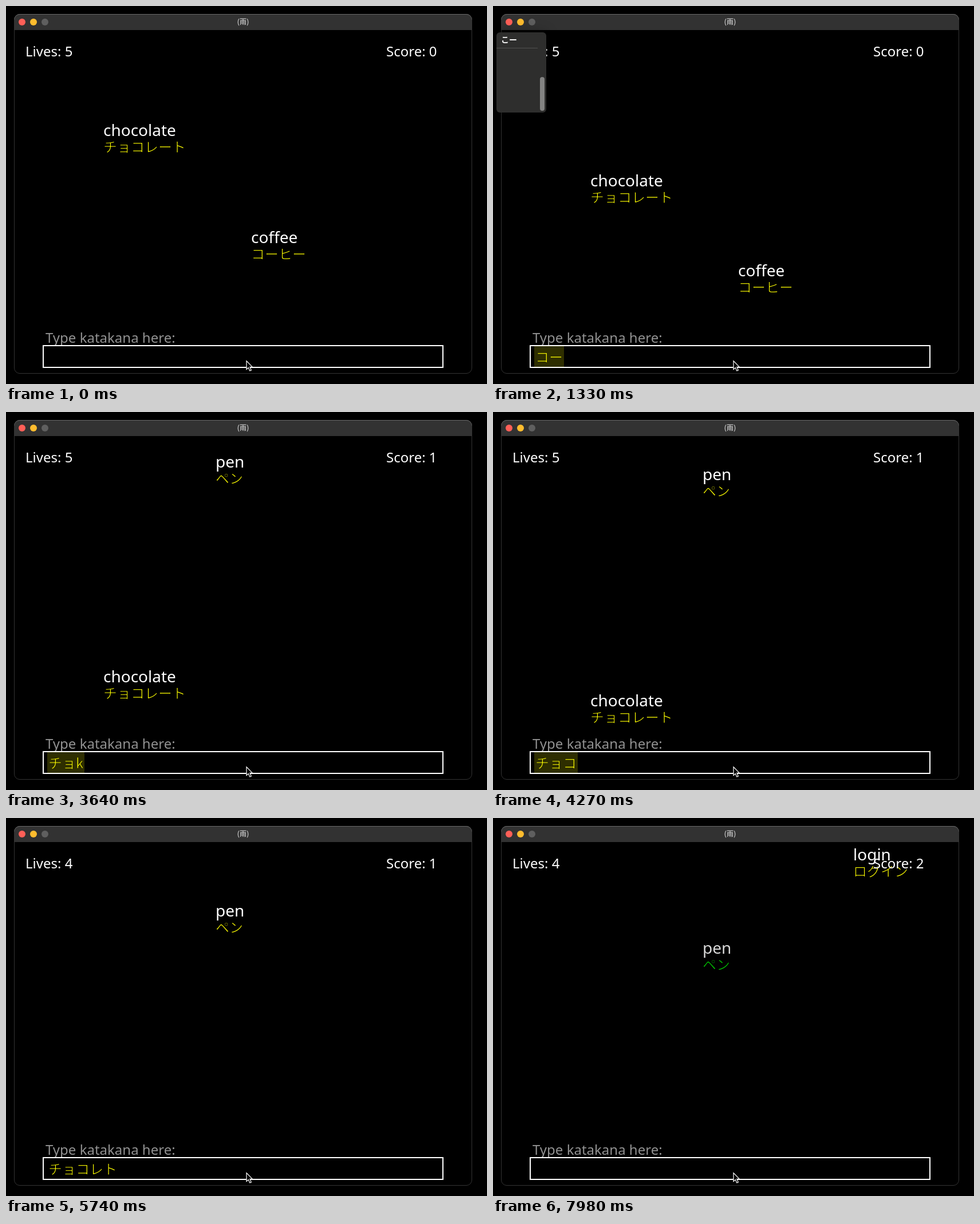
An HTML page with a canvas for the animation above (8000 ms loop, 840 by 660 pixels).

```html
<!DOCTYPE html>
<html lang="ja">
<head>
<meta charset="utf-8">
<title>(雨)</title>
<style>
html, body { margin: 0; width: 100%; height: 100%; overflow: hidden; background: #000; }
canvas { display: block; }
</style>
</head>
<body>
<canvas id="stage" width="840" height="660"></canvas>
<script>
const LOOP = 8000, STEP = 70;
const LATIN = '"Noto Sans", "Open Sans", sans-serif';
const CJK = '"Noto Sans CJK JP", "Noto Sans CJK", sans-serif';
const ctx = document.getElementById('stage').getContext('2d');

// path: [time, baseline] points; hit: moment the word is answered; gone: moment it is lost
const words = [
  { en: 'chocolate', ja: 'チョコレート', x: 170, gone: 5320,
    path: [[0, 227], [1330, 315], [2450, 393], [3640, 472], [4970, 560], [5320, 583]] },
  { en: 'coffee', ja: 'コーヒー', x: 428, hit: 2087,
    path: [[0, 414], [1330, 472], [2087, 505]] },
  { en: 'pen', ja: 'ペン', x: 366, hit: 7590,
    path: [[2970, 73], [3640, 97], [4970, 144], [6720, 208], [7590, 237]] },
  { en: 'login', ja: 'ログイン', x: 629, path: [[7980, 74], [8100, 78]] }
];

// [time, text, committed]
const typing = [
  [0, ''], [700, 'k'], [840, 'コ'], [1190, 'コー'], [1540, 'コーh'], [1680, 'コーヒ'],
  [1820, 'コーヒー'], [1960, 'コーヒー', true], [2087, ''],
  [3010, 'c'], [3150, 'ch'], [3360, 'チョ'], [3570, 'チョk'], [3710, 'チョコ'],
  [4340, 'チョコr'], [4480, 'チョコレ'], [4900, 'チョコレt'], [5110, 'チョコレト'],
  [5530, 'チョコレト', true], [6160, ''],
  [6860, 'p'], [7000, 'ペ'], [7210, 'ペn'], [7350, 'ペン'], [7490, 'ペン', true], [7590, '']
];

const popups = [
  { from: 1260, to: 1470, text: 'こー', w: 87, bar: [124, 59] },
  { from: 3850, to: 4060, text: 'ちょこ', w: 101, bar: [124, 59] },
  { from: 4900, to: 5040, text: 'チョコレート', w: 156, bar: [117, 54], emoji: true }
];

function textWidth(font, s) {
  ctx.font = font;
  return ctx.measureText(s).width;
}

const kanaFont = '100 24px ' + CJK;
const hasThin = textWidth(kanaFont, 'kt') !== textWidth('400 24px ' + CJK, 'kt');
const SS = 4;
const scratch = document.createElement('canvas');
scratch.width = 200 * SS;
scratch.height = 40 * SS;
const sc = scratch.getContext('2d');

function text(s, x, y, font, color) {
  ctx.font = font;
  ctx.fillStyle = color;
  ctx.fillText(s, x, y);
}

// Hairline kana; trims the regular weight where no thin one is installed
function kana(s, x, y, color) {
  if (hasThin) return text(s, x, y, kanaFont, color);
  sc.setTransform(SS, 0, 0, SS, 0, 0);
  sc.globalCompositeOperation = 'source-over';
  sc.clearRect(0, 0, 200, 40);
  sc.font = kanaFont;
  sc.fillStyle = color;
  sc.fillText(s, 4, 30);
  sc.globalCompositeOperation = 'destination-out';
  sc.lineWidth = 0.8;
  sc.lineJoin = 'round';
  sc.strokeText(s, 4, 30);
  ctx.imageSmoothingQuality = 'high';
  ctx.drawImage(scratch, x - 4, y - 30, 200, 40);
}

function rect(x, y, w, h, color) {
  ctx.fillStyle = color;
  ctx.fillRect(x, y, w, h);
}

function round(x, y, w, h, r, color) {
  ctx.beginPath();
  ctx.roundRect(x, y, w, h, r);
  ctx.fillStyle = color;
  ctx.fill();
}

function disc(x, y, r, color) {
  ctx.beginPath();
  ctx.arc(x, y, r, 0, Math.PI * 2);
  ctx.fillStyle = color;
  ctx.fill();
}

function along(path, t) {
  let i = 1;
  while (i < path.length - 1 && t > path[i][0]) i++;
  const [t0, y0] = path[i - 1], [t1, y1] = path[i];
  const k = Math.min(1, (t - t0) / (t1 - t0));
  return Math.round(y0 + (y1 - y0) * k);
}

function drawFrame() {
  rect(0, 0, 840, 660, '#000');
  round(14, 14, 800, 28, [10, 10, 0, 0], '#323232');
  ctx.lineWidth = 1;
  ctx.strokeStyle = '#333';
  ctx.beginPath();
  ctx.roundRect(14.5, 14.5, 799, 627, 9.5);
  ctx.stroke();
  const edge = ctx.createLinearGradient(0, 14, 0, 24);
  edge.addColorStop(0, '#6c6c6c');
  edge.addColorStop(1, '#444');
  ctx.strokeStyle = edge;
  ctx.beginPath();
  ctx.moveTo(14.5, 24);
  ctx.arcTo(14.5, 14.5, 24, 14.5, 9.5);
  ctx.lineTo(804, 14.5);
  ctx.arcTo(813.5, 14.5, 813.5, 24, 9.5);
  ctx.stroke();
  ['#ff5f57', '#febc2e', '#5f5f5f'].forEach((c, i) => disc(28 + 20 * i, 28, 6, c));
  ctx.textAlign = 'center';
  text('(雨)', 414, 32, 'bold 12px ' + CJK, '#b5b5b5');
  ctx.textAlign = 'left';
}

function drawWord(word, t) {
  const { en, ja, x, path, hit = Infinity, gone = hit + 1000 } = word;
  if (t < path[0][0] || t >= gone) return;
  const y = along(path, t);
  const done = t >= hit;
  ctx.globalAlpha = done ? 1 - ((t - hit) / 1000) ** 2 : 1;
  text(en, x, y, '28px ' + LATIN, '#fff');
  kana(ja, x, y + 28, done ? '#0f0' : '#ff0');
  ctx.globalAlpha = 1;
}

function drawInput(t) {
  text('Type katakana here:', 69, 588, '24px ' + LATIN, '#929292');
  rect(64, 592, 700, 40, '#fff');
  rect(66, 594, 696, 36, '#000');
  const [, typed, committed] = typing.filter(k => k[0] <= t).pop();
  if (!typed) return;
  if (!committed) rect(72, 594, Math.round(textWidth(kanaFont, typed)) + 4, 36, '#2e2e00');
  kana(typed, 74, 622, '#ff0');
}

function infoIcon(x, y) {
  ctx.strokeStyle = '#ddd';
  ctx.lineWidth = 1;
  ctx.beginPath();
  ctx.arc(x, y, 4.3, 0, Math.PI * 2);
  ctx.stroke();
  rect(x - 0.6, y - 2.6, 1.3, 1.3, '#ddd');
  rect(x - 0.6, y - 0.6, 1.3, 3, '#ddd');
  rect(x - 1.4, y - 0.6, 1.2, 0.8, '#ddd');
  rect(x - 1.4, y + 1.8, 2.8, 0.8, '#ddd');
}

function chocolateBar(x, y) {
  ctx.save();
  ctx.translate(x, y);
  ctx.rotate(Math.PI / 4.4);
  rect(-10, -5, 10, 10, '#6b3f33');
  rect(-9, -4, 3.5, 3.5, '#85543f');
  rect(-9, 0.5, 3.5, 3.5, '#85543f');
  rect(-4.5, -4, 3, 3.5, '#85543f');
  rect(-1.5, -5.5, 2, 11, '#c9b5b0');
  rect(0, -5.5, 10, 11, '#d8282a');
  rect(2, -5.5, 6, 5, '#ee3b36');
  ctx.restore();
}

function drawPopup({ text: label, w, bar, emoji }) {
  ctx.save();
  ctx.shadowColor = 'rgba(0,0,0,.3)';
  ctx.shadowBlur = 22;
  round(6, 46, w, 140, 6, '#2e2e2d');
  ctx.restore();
  text(label, 14, 64, 'bold 14px ' + CJK, '#f2f2f2');
  rect(6, 73, w - 15, 1, '#515150');
  round(w - 5, bar[0], 8, bar[1], 4, '#838382');
  if (!emoji) return;
  infoIcon(133, 59.5);
  infoIcon(133, 87.5);
  chocolateBar(25.5, 88);
  rect(6, 101, w - 15, 1, '#515150');
}

function drawCursor() {
  const pts = [[420, 619.8], [420, 634.5], [423.3, 631.4], [425.8, 637], [428.3, 636],
    [425.9, 630.4], [430.4, 630.4]];
  ctx.beginPath();
  pts.forEach(p => ctx.lineTo(...p));
  ctx.closePath();
  ctx.fillStyle = '#000';
  ctx.fill();
  ctx.lineWidth = 1.2;
  ctx.strokeStyle = '#fff';
  ctx.stroke();
}

function draw(t) {
  drawFrame();
  words.forEach(w => drawWord(w, t));
  const lives = t < 5320 ? 5 : 4;
  const score = words.filter(w => t >= w.hit).length;
  text('Lives: ' + lives, 34, 88, '24px ' + LATIN, '#fff');
  text('Score: ' + score, 664, 88, '24px ' + LATIN, '#fff');
  drawInput(t);
  popups.filter(p => t >= p.from && t < p.to).forEach(drawPopup);
  drawCursor();
}

const start = performance.now();
function tick() {
  const t = (performance.now() - start) % LOOP;
  draw(Math.floor(t / STEP) * STEP);
  requestAnimationFrame(tick);
}
tick();
</script>
</body>
</html>
```
